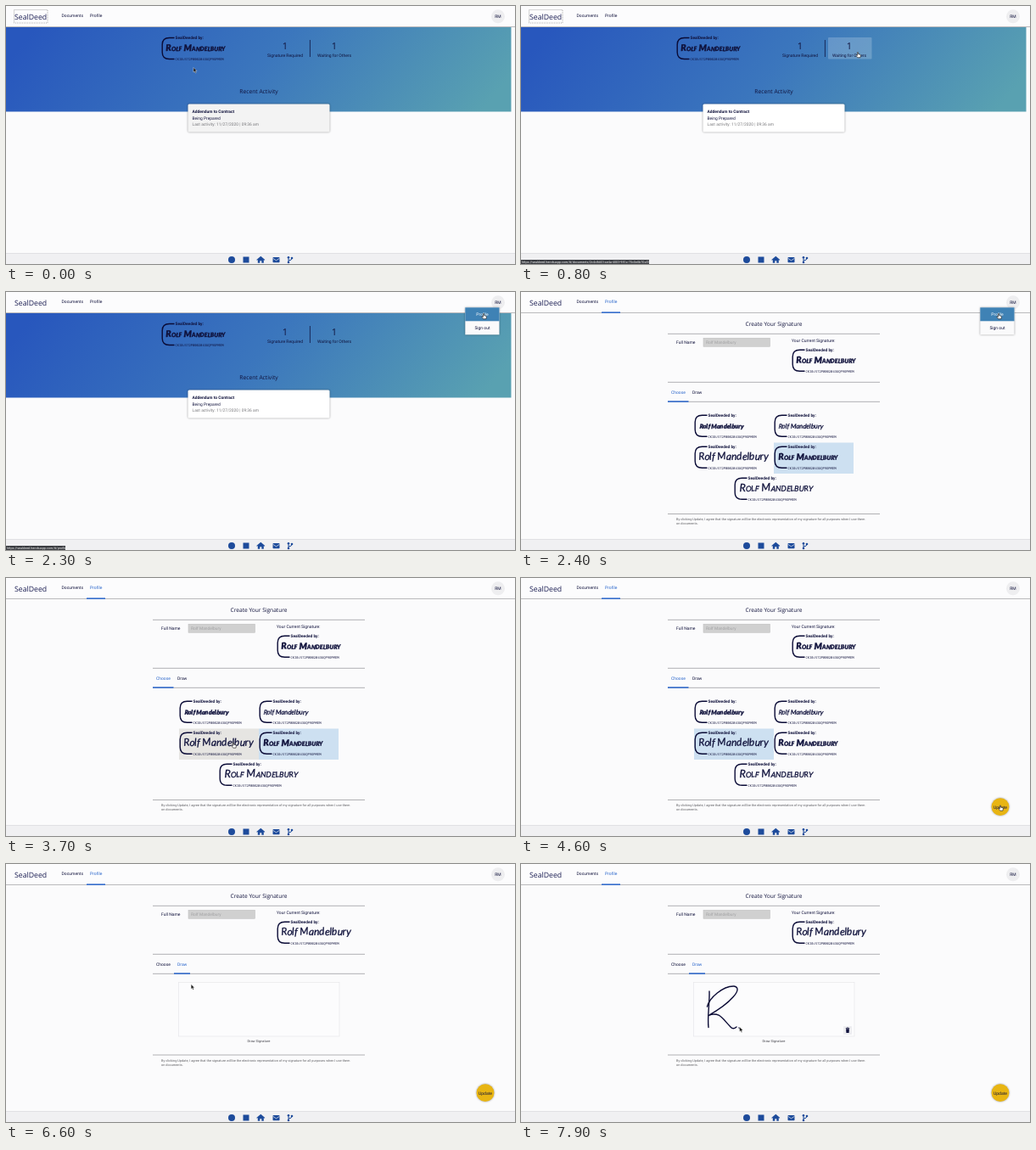
Write an HTML page that moves like this. It is 600x304 px and loops after 8000 ms.

```html
<!DOCTYPE html>
<html lang="en">
<head>
<meta charset="utf-8">
<title>SealDeed</title>
<style>
html, body { margin: 0; width: 100%; height: 100%; overflow: hidden; background: #fbfbfc; }
svg { display: block; width: 600px; height: 304px; font-family: Roboto, Arial, sans-serif; fill: #10123c; text-rendering: geometricPrecision; }
.head { font-family: "Open Sans", sans-serif; font-weight: 500; }
.mono { font-family: "Noto Sans Mono", "DejaVu Sans Mono", monospace; }
.hand { font-family: Lato, sans-serif; font-style: italic; stroke: #10123c; stroke-width: .3; }
.mid { text-anchor: middle; }
.rule { stroke: #b0b0b3; stroke-width: 1; }
.pen { fill: none; stroke: #0c0c36; stroke-width: 1.4; stroke-linecap: round; stroke-linejoin: round; }
.shade { filter: drop-shadow(0 .7px .8px rgba(0,0,0,.4)); }
</style>
</head>
<body>
<svg id="stage" viewBox="0 0 600 304"></svg>
<script>
const LOOP = 8000, BLUE = '#2a66cc', ICON = '#1d4b9b', PICKED = '#cde0f1';
const NAME = 'Rolf Mandelbury';
const SITE = 'https://sealdeed.herokuapp.com/#/';

const text = (x, y, size, str, attrs = '') =>
  `<text x="${x}" y="${y}" font-size="${size}" ${attrs}>${str}</text>`;
const rect = (x, y, w, h, fill, attrs = '') =>
  `<rect x="${x}" y="${y}" width="${w}" height="${h}" fill="${fill}" ${attrs}/>`;
const rule = y => `<path class="rule" d="M173 ${y}H423"/>`;
const group = (id, body, attrs = '') => `<g id="${id}" ${attrs}>${body}</g>`;

// Handwriting styles: size, weight, small capitals, left offset
const HANDS = {
  brush: [7.3, 900, false, 6],
  neat: [7.7, 400, false, 5],
  loose: [12, 400, false, 5],
  marker: [10.5, 900, true, 5],
  tall: [12.6, 400, true, 6]
};

function signature(x, y, hand) {
  const [size, weight, caps, dx] = HANDS[hand];
  const tilt = [...NAME].map((c, i) => Math.round(5 * Math.sin(i * 2.3 + size))).join(' ');
  const variant = caps ? 'font-variant="small-caps"' : '';
  return `<path d="M${x + 15} ${y}h-6q-8.3 0-8.3 8v9q0 8 8.3 8h6" fill="none" stroke="#0a0b36" stroke-width="1.4"/>` +
    text(x + 16, y + 1.5, 4.8, 'SealDeeded by:', 'font-weight="700"') +
    text(x + dx, y + 15.5, size, NAME, `class="hand" font-weight="${weight}" ${variant} rotate="${tilt}"`) +
    text(x + 16, y + 26.8, 3.8, 'CKI0JS72P0002043UQP9OPMEM', 'class="mono"');
}

const footnote = y =>
  text(183, y, 3.87, 'By clicking Update, I agree that the signature will be the electronic representation of my signature for all purposes when I use them', 'fill="#606064"') +
  text(183, y + 5, 3.87, 'on documents.', 'fill="#606064"');

const status = (id, w, path) =>
  group(id, rect(0, 299, w, 5, '#3b3d42') + text(1, 303, 3.75, SITE + path, 'fill="#f2f2f2"'));

const stat = (x, label) =>
  text(x, 51, 11, '1', 'class="head mid"') + text(x, 59.5, 5, label, 'class="mid"');

const home =
  rect(0, 24, 595.5, 100.5, 'url(#hero)') +
  signature(183.5, 37.5, 'marker') +
  rect(303, 37, 52, 25.5, '#fff', 'id="hoverSign" opacity=".2" rx="1"') +
  rect(362, 37, 51.5, 25.5, '#fff', 'id="hoverWait" opacity=".2" rx="1"') +
  stat(329, 'Signature Required') + stat(387, 'Waiting for Others') +
  rect(357.9, 40, .9, 20, '#14204e') +
  text(298, 102.7, 6.7, 'Recent Activity', 'class="head mid"') +
  rect(214.5, 115.5, 167, 33, '#fff', 'id="card" class="shade" rx="1.5"') +
  text(219.5, 126, 4.9, 'Addendum to Contract', 'font-weight="700"') +
  text(219.5, 133.5, 4.9, 'Being Prepared') +
  text(219.5, 141, 4.9, 'Last activity: 11/27/2020 | 09:36 am', 'fill="#77777b"');

const choose =
  rect(204, 177.5, 94, 36.5, '#e6e5e2', 'id="boxLoose"') +
  rect(298, 177.5, 94, 36.5, PICKED, 'id="boxMarker"') +
  rect(204, 141, 94, 36.5, '#e6e5e2', 'id="boxBrush"') +
  signature(204.5, 145.3, 'brush') + signature(298.5, 145.3, 'neat') +
  signature(204.5, 182.3, 'loose') + signature(298.5, 182.3, 'marker') +
  signature(251.5, 219.3, 'tall') +
  rule(261.5) + footnote(269);

const draw =
  rect(203.5, 139.5, 189.5, 63.5, '#fcfcfd', 'stroke="#e4e4e8" stroke-width=".6"') +
  text(298, 210.3, 4, 'Draw Signature', 'class="mid" fill="#45454d"') +
  group('trash', rect(380, 191, 10, 10, '#ededf0', 'rx="1"') +
    '<path d="M382.8 193h1.3l.4-.6h1l.4.6h1.3v.8h-4.4zM383.1 194.2h3.8l-.3 4.8h-3.2z"/>') +
  '<path id="ink0" class="pen" d="M222 150C222.5 164 219.5 180 221 192.5"/>' +
  '<path id="ink1" class="pen" d="M219.5 168C222 158 238 143.5 251 144C263 146 247 164 221 178.5C234 173 238 183 247 192Q250 195.5 254 192"/>' +
  '<path id="ink2" class="pen" d="M257 193l.6 .5" stroke-width="1.8"/>' +
  rule(225) + footnote(233);

const profile =
  text(298, 40, 6.6, 'Create Your Signature', 'class="head mid"') +
  rule(49.3) + rule(106.3) + rule(129.3) +
  text(183, 61, 5, 'Full Name') +
  rect(215, 54.3, 78.5, 10, '#d0d0d0', 'stroke="#bcbcbc" stroke-width=".5"') +
  text(218, 61.2, 4.9, NAME, 'fill="#a2a2a4"') +
  text(319, 59, 5, 'Your Current Signature:') +
  group('oldSign', signature(319.5, 68.3, 'marker')) +
  group('newSign', signature(319.5, 68.3, 'loose')) +
  text(177, 119.8, 5, 'Choose', 'id="tabChoose"') + text(202, 119.8, 5, 'Draw', 'id="tabDraw"') +
  rect(173, 128.3, 24.5, 1.5, BLUE, 'id="lineChoose"') +
  rect(198, 128.3, 19, 1.5, BLUE, 'id="lineDraw"') +
  group('choose', choose) + group('draw', draw) +
  group('update', '<circle cx="565" cy="269.7" r="10.4" fill="#e8b513" class="shade"/>' +
    text(565, 271.5, 5, 'Update', 'class="mid"'));

const header =
  rect(0, 0, 600, 24, '#fcfcfd') + rect(0, 24, 600, 1, '#b9b9bc') +
  text(10, 16, 8.7, 'SealDeed', 'class="head" fill="#1a1d52"') +
  rect(9.5, 4.5, 39.5, 15.5, 'none', 'id="focus" stroke="#777" stroke-width=".6" stroke-dasharray="1 1"') +
  text(65.5, 12.7, 5, 'Documents') + text(99, 12.7, 5, 'Profile', 'id="navProfile"') +
  rect(95, 23.4, 22, 1.5, BLUE, 'id="navLine"') +
  '<circle cx="580" cy="12.3" r="8" fill="#eeeef0"/>' + text(580, 14.2, 5, 'RM', 'class="mid"');

const footer =
  rect(0, 291.3, 600, 13, '#f0f0f2') + rect(0, 291.3, 600, .6, '#d4d4d7') +
  `<g fill="${ICON}"><circle cx="266" cy="299" r="4"/>${rect(279.5, 295.5, 7, 7, ICON)}
  <path d="M300.3 294.8l5 4.3-.6.7-.9-.7v3.700h-2.500v-2.500h-2v2.500h-2.500v-3.700l-.9.7-.6-.7z"/>
  ${rect(314.5, 296, 8, 6.3, ICON, 'rx=".8"')}<path d="M314.5 297.2l4 2.7 4-2.7" fill="none" stroke="#f0f0f2" stroke-width=".7"/>
  <path d="M333 297v5M337 297.5q0 2.3-4 2.3" fill="none" stroke="${ICON}"/>
  <circle cx="333" cy="296.3" r="1.3"/><circle cx="333" cy="302" r="1.3"/><circle cx="337" cy="297" r="1.3"/></g>`;

const menu = group('menu',
  rect(541.3, 18.3, 40.2, 32, '#fafafb', 'class="shade"') +
  rect(541.3, 18.3, 40.2, 16, '#3f82b5', 'id="menuHot"') +
  text(561.5, 28.2, 5, 'Profile', 'id="menuText" class="mid"') +
  text(561.5, 44, 5, 'Sign out', 'class="mid"'));

const cursor = group('cursor',
  '<path id="arrow" d="M0 0v5.5l1.3-1.1.9 2 1-.4-.9-2h1.7z" fill="#111" stroke="#fff" stroke-width=".4"/>' +
  '<path id="palm" d="M-.6 .2q.6-.8 1.2 0v2l2.3.6q.6.2.5.9l-.4 2.5h-3.3l-1.9-2.5q.2-.9 1-.3l.6.5z" fill="#fff" stroke="#111" stroke-width=".6"/>');

document.getElementById('stage').innerHTML =
  `<defs><linearGradient id="hero" x1="0" y1=".43" x2="1" y2=".57">
    <stop stop-color="#2857bd"/><stop offset=".5" stop-color="#3b76bd"/><stop offset="1" stop-color="#59a1b1"/>
  </linearGradient></defs>` +
  rect(0, 0, 600, 304, '#fbfbfc') + group('home', home) + group('profile', profile) +
  header + footer + menu + status('linkDoc', 151, 'documents/2c4c8d43-ae4a-4003-981a-70c0e0b70a53') +
  status('linkProfile', 70, 'profile') + cursor;

const el = id => document.getElementById(id);
const show = (id, on) => el(id).style.display = on ? '' : 'none';
const ramp = (t, a, b) => Math.min(1, Math.max(0, (t - a) / (b - a)));

// Pointer stops: time, x, y
const STOPS = [
  [0, 221, 72.5], [100, 221, 72.5], [400, 330, 53], [800, 397, 54.5], [1550, 397, 54.5],
  [1800, 578, 12], [2000, 578, 12], [2200, 563, 25.5], [2450, 563, 25.5], [2700, 112, 12],
  [2850, 112, 12], [3150, 235, 158], [3350, 355, 188], [3500, 320, 224], [3650, 268, 194],
  [3850, 268, 194], [4500, 565, 268], [5050, 565, 268], [5550, 393, 163.5], [5700, 393, 163.5],
  [5800, 322, 202], [6200, 207, 118], [6400, 207, 118], [6700, 222, 150]
];
const STROKES = [[7100, 7300], [7350, 7750], [7800, 7850]];
const inks = STROKES.map((s, i) => el('ink' + i));
const lengths = inks.map(p => p.getTotalLength());

function pointer(t) {
  for (let i = 2; i >= 0; i--) {
    const [a, b] = STROKES[i];
    if (t >= a) {
      const p = inks[i].getPointAtLength(lengths[i] * ramp(t, a, b));
      return [p.x, p.y - (i === 2 ? 1.5 : 0)];
    }
  }
  const next = STOPS.findIndex(s => s[0] > t);
  if (next < 0) return STOPS[STOPS.length - 1].slice(1);
  const [a, ax, ay] = STOPS[next - 1], [b, bx, by] = STOPS[next];
  const k = ramp(t, a, b), e = k * k * (3 - 2 * k);
  return [ax + (bx - ax) * e, ay + (by - ay) * e];
}

function render(t) {
  const [x, y] = pointer(t);
  const within = (l, top, r, b) => x >= l && x <= r && y >= top && y <= b;
  const onProfile = t >= 2400, drawing = t >= 6400, picked = t >= 3850;
  const overSign = !onProfile && within(303, 37, 355, 62.5);
  const overWait = !onProfile && within(362, 37, 413.5, 62.5);
  const menuOpen = t >= 2000 && t < 2600;
  const overItem = menuOpen && within(541, 18, 581.5, 34);

  show('home', !onProfile);
  show('profile', onProfile);
  show('hoverSign', overSign);
  show('hoverWait', overWait);
  const shade = Math.round(243 + 12 * ramp(t, 0, 300));
  el('card').setAttribute('fill', `rgb(${shade},${shade},${shade})`);
  show('linkDoc', overSign || overWait);
  show('linkProfile', overItem && !onProfile);
  show('focus', t < 2000);
  show('navLine', onProfile);
  el('navProfile').style.fill = onProfile ? BLUE : '';
  show('menu', menuOpen);
  show('menuHot', overItem);
  el('menuText').style.fill = overItem ? '#fff' : '';

  const overLoose = within(204, 177.5, 298, 214);
  show('boxBrush', !drawing && within(204, 141, 298, 177.5));
  show('boxLoose', picked || overLoose);
  el('boxLoose').style.fill = picked ? PICKED : '';
  show('boxMarker', !picked);
  show('update', picked);
  show('oldSign', t < 5100);
  show('newSign', t >= 5100);
  show('choose', !drawing);
  show('draw', drawing);
  show('lineChoose', !drawing);
  show('lineDraw', drawing);
  el('tabChoose').style.fill = drawing ? '' : BLUE;
  el('tabDraw').style.fill = drawing ? BLUE : '';
  show('trash', t >= 7100);

  inks.forEach((ink, i) => {
    const [a, b] = STROKES[i];
    show(ink.id, t > a);
    ink.style.strokeDasharray = `${lengths[i] * ramp(t, a, b)} 999`;
  });

  const hand = overSign || overWait || overItem || (t > 1780 && t < 2450) ||
    (t > 4400 && t < 5150) || (t > 6100 && t < 6450) || (t > 3100 && t < 3900);
  show('palm', hand);
  show('arrow', !hand);
  el('cursor').setAttribute('transform', `translate(${x} ${y})`);
}

const start = performance.now();
function tick() {
  render((performance.now() - start) % LOOP);
  requestAnimationFrame(tick);
}
tick();
</script>
</body>
</html>
```
